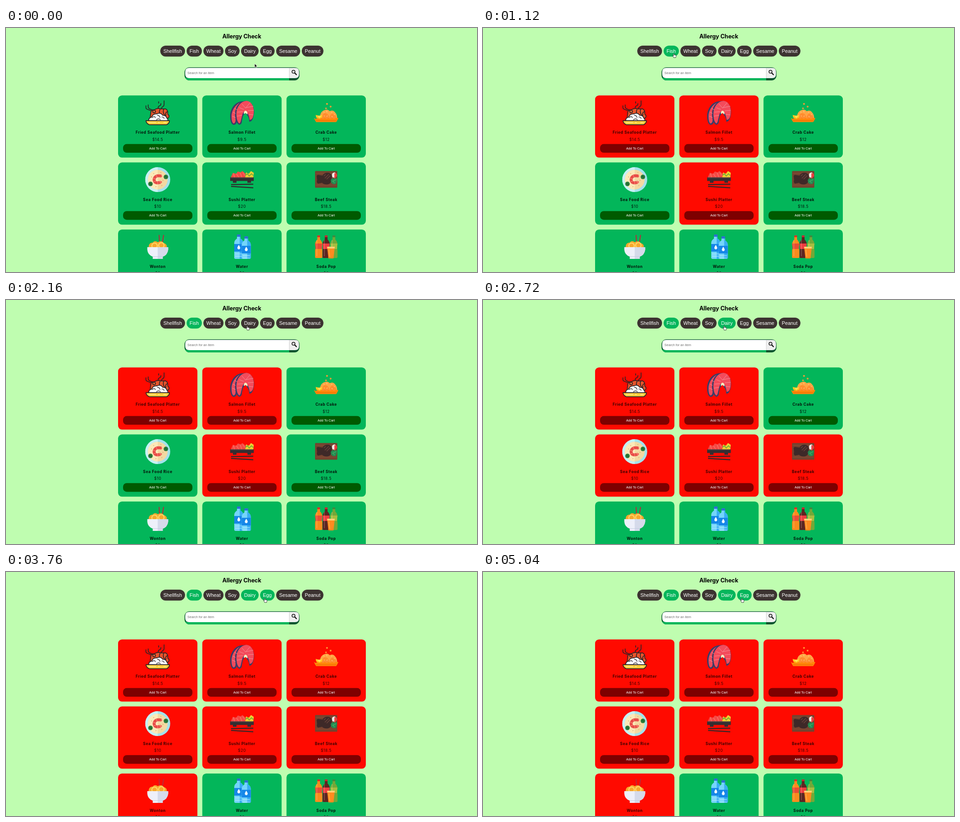
An HTML page that plays this animation: 1038 px wide and 540 px high, repeating every 5120 ms.

```html
<!DOCTYPE html>
<html lang="en">
<head>
<meta charset="utf-8">
<title>Allergy Check</title>
<style>
html, body { margin: 0; width: 100%; height: 100%; overflow: hidden; background: #bffdb0; }
svg { display: block; width: 1038px; height: 540px; }
text { text-anchor: middle; }
.title, .name, .price { font-family: Inter, sans-serif; }
.title { font-size: 12.7px; font-weight: 700; letter-spacing: -.1px; }
.name, .price { font-size: 8.4px; letter-spacing: .56px; fill: #04140a; }
.name { font-weight: 700; }
.tag text, .buy, .hint { font-family: "Liberation Sans", Arial, sans-serif; }
.tag text { font-size: 10.9px; fill: #fff; }
.tag rect { fill: #3c3331; }
.tag.on rect { fill: #05b65b; }
.buy { font-size: 7.2px; fill: #fff; }
.hint { font-size: 7.23px; fill: #6f6f6f; text-anchor: start; }
.panel { fill: #03b65a; }
.button { fill: #005a00; }
.bad .panel { fill: #ff0a00; }
.bad .button { fill: #7e0000; }
.bad .name, .bad .price { fill: #3a0200; }
</style>
</head>
<body>
<svg id="stage" viewBox="0 0 1038 540">
  <rect width="1038" height="540" fill="#bffdb0"/>
  <text class="title" x="519.6" y="23.4">Allergy Check</text>
  <g id="tags"></g>
  <clipPath id="field"><rect x="393.5" y="87" width="253.3" height="29" rx="11"/></clipPath>
  <g clip-path="url(#field)">
    <rect x="393" y="87" width="254" height="29" fill="#07552e"/>
    <path d="M393 109L395 109Q397 111 402 111H624V116H393Z" fill="#03b65a"/>
    <path d="M624 88.2H404Q395 88.2 395 97V102Q395 111 404 111H624Z" fill="#fff"/>
    <path d="M624 88.2H637Q645.8 88.2 645.8 97V102Q645.8 111 637 111H624Z" fill="#efefef"/>
    <path d="M624.3 88V111" stroke="#c9c9c9" stroke-width=".8"/>
  </g>
  <text class="hint" x="399.8" y="101.7">Search for an item</text>
  <g fill="none" stroke="#111">
    <circle cx="633.6" cy="96.8" r="3.3" stroke-width="1.5"/>
    <path d="M636.2 99.4L640 103.2" stroke-width="2.3" stroke-linecap="round"/>
  </g>
  <g id="cards"></g>
  <path id="arrow" d="M0 0V8.2L1.9 6.4L3.2 9.3L4.6 8.7L3.3 5.8H5.8Z" fill="#111" stroke="#fff" stroke-width=".6"/>
  <path id="hand" d="M-.9 .8Q0 -.5 .9 .8V3.6L2.2 3.4L3.3 3.8L4.4 4.1Q5 4.3 5 5.2V6.6L4.2 8V9.4H-.5V8.4L-2.8 5.6Q-3 4.3 -1.8 4.7L-.9 5.5Z" fill="#fff" stroke="#111" stroke-width=".75" stroke-linejoin="round"/>
</svg>
<script>
const LOOP = 5120, STEP = 80;
const el = id => document.getElementById(id);

// Icons sit around x = 0, with y measured from the top of the card.
const platter = `
  <g fill="none" stroke="#2b2326" stroke-width="1.7" stroke-linecap="round" stroke-linejoin="round">
    <path d="M1 29V27Q1 24 4 23Q7 22 7 19V18M8 32V29Q8 27 11 25Q14 23 14 20V12M2 14V17"/>
    <path d="M-26 23V27Q-26 30 -22 31L-14 34M-21 21V25Q-21 28 -17 30L-10 33"/>
    <path d="M-15 36Q-13 31 -7 32Q-2 27 8 30L18 30Q23 33 22 41L25 45Q25 51 19 51L-17 51Z" fill="#e8542c"/>
    <path d="M5 31Q1 39 8 46M13 31Q10 39 17 45M22 36Q16 37 18 44"/>
    <circle cx="-8" cy="35.5" r="3" fill="#ef6a36"/>
    <path d="M-20 56Q-20 49 -13 48Q-11 40 -2 41Q6 37 11 44Q18 44 20 50Q23 52 22 57Z" fill="#f5f6fa"/>
    <path d="M-12 49Q-8 45 -5 49M-1 44Q4 44 5 49M9 48Q13 47 14 51M-3 54Q2 50 6 54" stroke-width="1.2"/>
    <path d="M-26 56H26Q25 63 19 65H-18Q-25 63 -26 56Z" fill="#ffd03b"/>
    <path d="M-20 60H-4M1 60H4M13 60H19" stroke="#fff0a2" stroke-width="1.2"/>
  </g>`;

const salmon = `
  <path d="M3 13C-14 12 -27 29 -26 47C-26 57 -23 65 -18 65C-12 65 -11 59 -11 53Z" fill="#383d68"/>
  <path d="M2 15C-11 15 -23 31 -23 46C-23 56 -21 62 -18 62Q-14 61 -14 53Z" fill="#ee4b5c"/>
  <path d="M8 12C-10 13 -17 31 -15 47Q-14 61 -6 65Q0 64 0 56L2 46L7 38L11 43Q16 49 16 58Q22 59 25 48C30 31 24 12 8 12Z" fill="#383d68"/>
  <path d="M9 12C-6 14 -14 30 -12 46Q-11 58 -6 62Q-3 61 -2 54L1 42Q4 34 9 36Q15 39 17 54Q23 54 25 45C29 28 22 12 9 12Z" fill="#f34b5b"/>
  <path d="M4 41Q4 33 9 34Q13 36 12 42L8 39Z" fill="#f6efc2"/>
  <path d="M-20 37L-14 40M-21 46L-14 49M-16 29L-10 32M-10 37L2 36M-11 46L0 44M-6 27L4 31M0 19L8 28L18 16M9 27L25 24M13 34L26 33M15 42L25 43" fill="none" stroke="#f5969c" stroke-width=".9"/>`;

const crab = `
  <g fill="#ff9a35">
    <rect x="0" y="17" width="3.6" height="3.6" rx="1"/><rect x="8" y="23" width="3.6" height="3.6" rx="1"/><rect x="-2" y="27" width="3.2" height="3.2" rx="1"/>
  </g>
  <path d="M-14 54Q-15 35 -2 32Q4 30 8 35Q15 31 20 38Q25 43 24 54Z" fill="#ffa544"/>
  <path d="M-10 53Q-11 42 -3 39Q7 40 7 53ZM7 53Q8 40 15 40Q23 44 23 53Z" fill="#ff8c2f"/>
  <path d="M-6 36L-4 38M1 34L2 37M11 37L13 38M17 42L19 43M-5 45L-3 46M1 47L3 45M12 46L14 48" stroke="#ffd08a" stroke-width="1.2"/>
  <path d="M-23 43Q-16 46 -8 43Q-8 52 -16 52Q-23 51 -23 43Z" fill="#ffc51d"/>
  <path d="M-21 44Q-16 47 -9 44L-15 50Z" fill="#ffe05a"/>
  <path d="M-27 50L-23 52L-19 50L-15 52L-11 50L-7 52L-3 50L1 52L5 50L9 52L13 50L17 52L21 50L27 50L24 56L22 59H-22L-24 56Z" fill="#ff8709"/>
  <path d="M-22 56H22" stroke="#ed6d05" stroke-width="1.2"/>`;

const rice = `
  <circle cy="38" r="27.5" fill="#a3e2ec"/><path d="M0 10.5A27.5 27.5 0 0 0 0 65.5Z" fill="#c6f1f4"/>
  <circle cy="38" r="21.8" fill="#f3d9a2"/><path d="M0 16.2A21.8 21.8 0 0 0 0 59.8Z" fill="#fbe9b9"/>
  <path d="M8 30Q-7 27 -8 38Q-7 48 5 44" fill="none" stroke="#e84d48" stroke-width="6.5"/>
  <path d="M8 27L10 31L7 34M5 40L10 43L6 48" fill="#f5645c"/>
  <path d="M-4 27L-1 33M-10 35L-4 37M-9 43L-4 41M0 48L0 43" stroke="#ff9b86" stroke-width="1"/>
  <g fill="#2c7c3b"><circle cx="-16" cy="47.5" r="5"/><circle cx="18" cy="32" r="5"/></g>
  <path d="M-18 46L-14 49M16 30L20 33" stroke="#175e2a" stroke-width="1.5"/>
  <path d="M-10 24L-8 25M-14 31L-13 33M6 22L8 23M10 39L13 40M-5 54L-3 53M8 52L10 50" stroke="#dcae6d" stroke-width="1.3"/>`;

const sushi = `
  <path d="M-25 34L-20 23L-13 25L-9 20L-3 22L1 19L8 25L7 34Z" fill="#f44945"/>
  <path d="M-19 24L-16 34M-12 25L-7 33M-4 23L0 33M2 22L6 29" stroke="#ff8c79" stroke-width="1"/>
  <path d="M7 34L9 22L15 25L20 19L26 23L25 34Z" fill="#f0ce32"/>
  <path d="M8 28L12 25L16 30L21 25L25 29" fill="none" stroke="#70ae39" stroke-width="2"/>
  <path d="M-26 33H26V41H20V45H12V41H-12V45H-20V41H-26Z" fill="#352d30"/>
  <path d="M-25 34H25" stroke="#54484a" stroke-width="1.2"/>
  <path d="M-24 49L25 48M-24 53L25 56" stroke="#30272a" stroke-width="2.3"/>`;

const steak = `
  <rect x="-24.5" y="19" width="49" height="37" rx="1.5" fill="#74432f"/>
  <path d="M-23 24H23M-23 50H23" stroke="#8a5138" stroke-width="1"/>
  <path d="M-21 30Q-20 26 -15 28L-8 29Q-4 21 6 23Q14 25 12 35Q12 48 2 49Q-6 49 -9 45L-18 47Q-22 44 -20 39Z" fill="#3e2928"/>
  <path d="M-5 30L-1 26M-3 35L6 26M1 37L9 29" stroke="#68423a" stroke-width="1.5"/>
  <path d="M14 33Q10 23 19 22L23 26L19 34Z" fill="#f0eee9"/><path d="M18 24Q24 22 24 30L18 37Z" fill="#e94040"/>
  <path d="M10 39Q14 32 19 36Q24 32 24 39L22 47Q15 50 11 45Z" fill="#248a50"/>
  <path d="M13 42L22 38M16 41L18 46" stroke="#55bd72" stroke-width="1"/>`;

const wonton = `
  <path d="M4 31L3 12M10 30L13 12" stroke="#b72c3b" stroke-width="2"/>
  <path d="M-20 42Q-21 29 -11 29Q-7 23 0 28Q9 23 13 30Q21 31 20 42Z" fill="#f7a72d"/>
  <g fill="none" stroke="#ffd261" stroke-width="2.6"><circle cx="-7" cy="36" r="6"/><circle cx="8" cy="35" r="6"/></g>
  <path d="M-23 39H23V45Q21 57 11 60V65H-11V60Q-22 56 -23 45Z" fill="#eef0fa"/>
  <path d="M0 39H23V45Q21 57 11 60V65H0Z" fill="#d5daea"/>
  <path d="M-11 60H11" stroke="#c1c9df"/>`;

const bottle = (x, y, h) => `<g transform="translate(${x} ${y})">
  <rect x="-4" width="8" height="5" rx="1" fill="#2e6fd4"/>
  <path d="M-4 5H4V9Q10 13 10 19V${h - 3}Q10 ${h} 7 ${h}H-7Q-10 ${h} -10 ${h - 3}V19Q-10 13 -4 9Z" fill="#74d5fb"/>
  <path d="M2 5H4V9Q10 13 10 19V${h - 3}Q10 ${h} 7 ${h}H2Z" fill="#38aef2"/>
  <rect x="-10" y="21" width="20" height="17" fill="#1687e8"/>
  <path d="M0 23Q-4 29 -3 31Q0 35 3 31Q4 29 0 23Z" fill="#f1fbff"/>
  <path d="M-8 43H8M-8 48H8" stroke="#c8f2ff" stroke-width="1.2"/></g>`;
const water = bottle(-7, 11, 54) + bottle(9.5, 15, 50);

const soda = (x, drink, label, cap) => `<g transform="translate(${x} 13)">
  <rect x="-3" width="6" height="4" fill="${cap}"/>
  <path d="M-3 4H3V9Q8 14 8 20Q6 27 8 33V48Q8 50 6 50H-6Q-8 50 -8 48V33Q-6 27 -8 20Q-8 14 -3 9Z" fill="${drink}"/>
  <path d="M-7.7 18H7.7L7 30H-7Z" fill="${label}"/>
  <path d="M-4 10V46" stroke="#fff" stroke-opacity=".23" stroke-width="1.5"/></g>`;
const pop = soda(-16.5, "#f98c1d", "#e94d35", "#df3029") + soda(0, "#5d2521", "#ef3d40", "#c62832") +
  soda(17, "#72a838", "#a6bd40", "#418840") + `
  <path d="M2 38H19L16 64H5Z" fill="#ff8b1f"/><path d="M2 38H19L18.5 42H2.5Z" fill="#ffd076"/>
  <path d="M6 44L8 61" stroke="#ffb150" stroke-width="1.5"/>`;

const clicks = { Fish: 960, Dairy: 2480, Egg: 3680 };
const tags = [
  ["Shellfish", 340, 394.6], ["Fish", 398, 431.7], ["Wheat", 435, 479.4], ["Soy", 482.6, 514.8],
  ["Dairy", 518, 556.8], ["Egg", 560, 592], ["Sesame", 595.4, 648.4], ["Peanut", 651.8, 699.6]
];
const foods = [
  ["Fried Seafood Platter", "$14.5", platter, "Fish"], ["Salmon Fillet", "$9.5", salmon, "Fish"], ["Crab Cake", "$12", crab, "Egg"],
  ["Sea Food Rice", "$10", rice, "Dairy"], ["Sushi Platter", "$20", sushi, "Fish"], ["Beef Steak", "$18.5", steak, "Dairy"],
  ["Wonton", "$8", wonton, "Egg"], ["Water", "$2", water], ["Soda Pop", "$3", pop]
];

el("tags").innerHTML = tags.map(([name, a, b]) => `<g class="tag">
  <rect x="${a}" y="39" width="${b - a}" height="24.2" rx="12.1"/>
  <text x="${(a + b) / 2}" y="55">${name}</text></g>`).join("");

el("cards").innerHTML = foods.map(([name, price, icon], i) => `
  <g transform="translate(${334.4 + i % 3 * 185.6} ${149.2 + Math.floor(i / 3) * 148.4})">
  <rect class="panel" x="-87.4" width="174.8" height="137.6" rx="8.7"/>${icon}
  <text class="name" y="85">${name}</text><text class="price" y="100.4">${price}</text>
  <rect class="button" x="-76.4" y="107.6" width="152.8" height="19.2" rx="8"/>
  <text class="buy" y="119.7">Add To Cart</text></g>`).join("");

const tagNodes = [...el("tags").children], cardNodes = [...el("cards").children];

// Pointer stops: time, x, y
const stops = [[0, 548, 79], [160, 548, 79], [800, 420.7, 56.2], [1280, 420.7, 56.2],
  [2000, 531.7, 57.2], [2880, 531.7, 57.2], [3280, 570.3, 58], [LOOP, 570.3, 58]];

function pointer(t) {
  const i = stops.findIndex((s, k) => k && t < s[0]);
  const [t0, x0, y0] = stops[i - 1], [t1, x1, y1] = stops[i];
  const u = (t - t0) / (t1 - t0), e = u * u * (3 - 2 * u);
  return [x0 + (x1 - x0) * e, y0 + (y1 - y0) * e];
}

function draw(t) {
  const on = name => t >= clicks[name];
  tagNodes.forEach((n, i) => n.classList.toggle("on", on(tags[i][0])));
  cardNodes.forEach((n, i) => n.classList.toggle("bad", on(foods[i][3])));
  const [x, y] = pointer(t);
  const over = y >= 39 && y <= 63.2 && tags.some(([, a, b]) => x >= a && x <= b);
  for (const [id, show] of [["arrow", !over], ["hand", over]]) {
    el(id).setAttribute("transform", `translate(${x} ${y})`);
    el(id).setAttribute("visibility", show ? "visible" : "hidden");
  }
}

const start = performance.now();
function tick() {
  const t = (performance.now() - start) % LOOP;
  draw(Math.floor(t / STEP) * STEP);
  requestAnimationFrame(tick);
}
tick();
</script>
</body>
</html>
```
